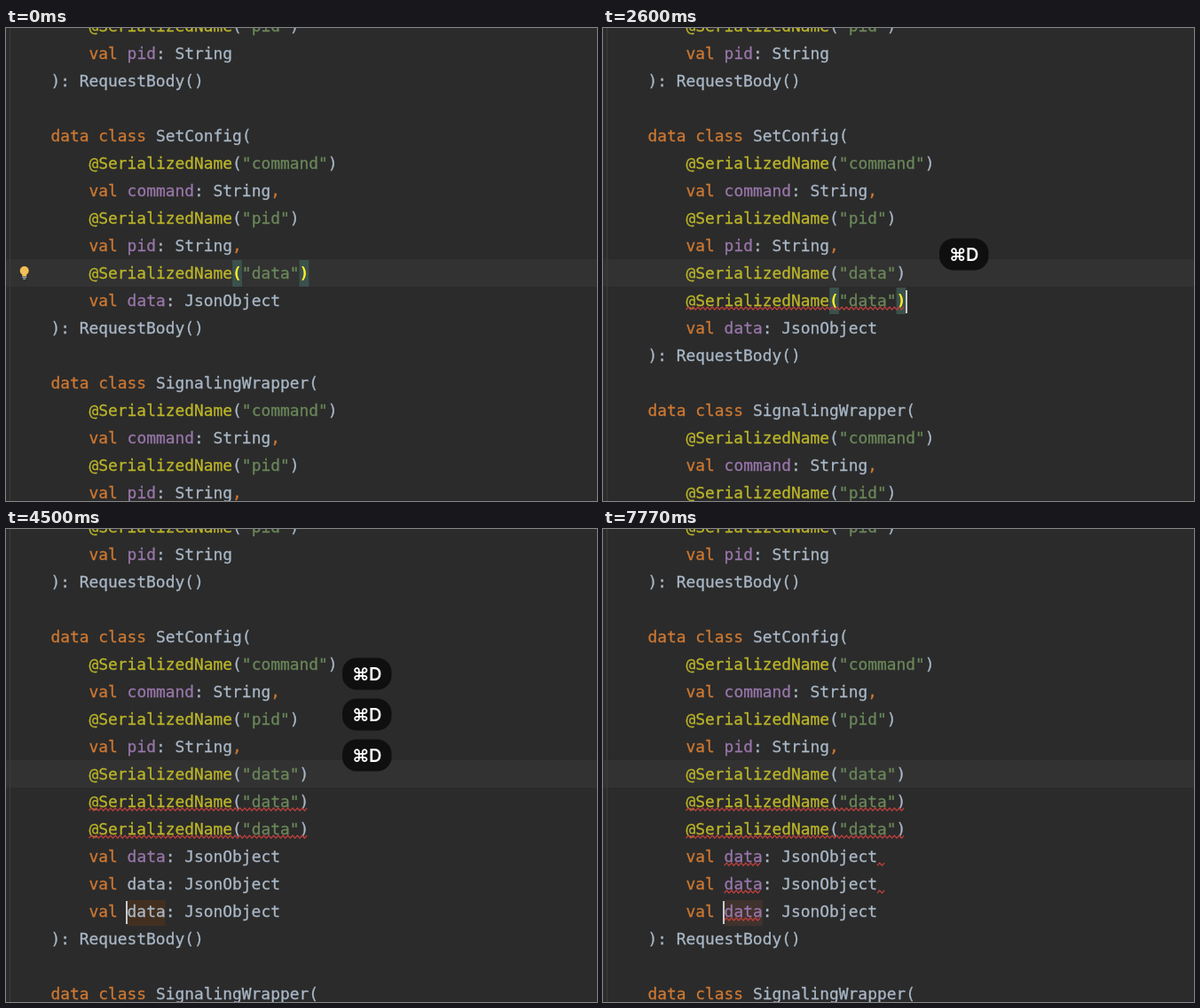
Recreate the animation shown at these times as an HTML page. Size 666 by 534 pixels, loop 7.8 s.

```html
<!DOCTYPE html>
<html lang="en">
<head>
<meta charset="utf-8">
<title>Duplicating lines in an editor</title>
<style>
  html, body { margin: 0; width: 100%; height: 100%; overflow: hidden; background: #2b2b2b; }
  svg { display: block; }
  .code text { font: 17.9px "DejaVu Sans Mono", monospace; white-space: pre; stroke-width: 0.3px; }
  .code text { fill: #a9b7c6; stroke: #a9b7c6; }
  .code .keyword { fill: #cc7832; stroke: #cc7832; }
  .code .annotation { fill: #bbb529; stroke: #bbb529; }
  .code .string { fill: #6a8759; stroke: #6a8759; }
  .code .property { fill: #9876aa; stroke: #9876aa; }
  .code .brace { fill: #ffef28; stroke: none; font-weight: bold; }
  .keys text { font: 600 20px Inter, "DejaVu Sans", sans-serif; fill: #fff; }
</style>
</head>
<body>
<svg id="stage" width="666" height="534" viewBox="0 0 666 534"></svg>
<script>
const LOOP = 7800;
const LEFT = 50.4, CHAR = 10.776, ROW = 31, FIRST_BASELINE = 4;
const DATA_ROW = 9;

// Key presses: the first two repeat the annotation, the last two the property.
const PRESSES = [2050, 2670, 3970, 4300];
const PILL_LIFE = 2350, PILL_FADE = 200;
const CARET_MOVED = 3750;
const ERRORS_AT = { firstCopy: 2500, secondCopy: 3060, properties: 5480 };
const BULB_SPANS = [[0, 970], [5480, 7000]];
const CARET_OFF = [[0, 430], [970, 1505], [3100, 3570], [4930, 5430], [6030, 6500], [7100, 7570]];

const stage = document.getElementById('stage');
const within = (t, spans) => spans.some(([from, to]) => t >= from && t < to);
const columnX = column => LEFT + column * CHAR;
const baseline = row => FIRST_BASELINE + row * ROW;
const rect = (x, y, w, h, fill, extra = '') =>
  `<rect x="${x}" y="${y}" width="${w}" height="${h}" fill="${fill}" ${extra}/>`;

const field = (name, type) => [`    @SerializedName("${name}")`, `    val ${name}: ${type}`];

function sourceLines(annotations, properties) {
  const [annotation, property] = field('data', 'JsonObject');
  return [
    ...field('pid', 'String'),
    '): RequestBody()',
    '',
    'data class SetConfig(',
    ...field('command', 'String,'),
    ...field('pid', 'String,'),
    ...Array(annotations).fill(annotation),
    ...Array(properties).fill(property),
    '): RequestBody()',
    '',
    'data class SignalingWrapper(',
    ...field('command', 'String,'),
    ...field('pid', 'String,')
  ];
}

const TOKEN = /(data class|val(?= ))|(@\w+)|("\w+")|((?<=val )\w+)|(,)|([()])/g;

function codeLine(text, row, { braces = false, unresolved = false }) {
  const span = (kind, s) => `<tspan class="${kind}">${s}</tspan>`;
  const body = text.trimStart();
  const markup = body.replace(TOKEN, (all, keyword, annotation, string, property, comma, paren) => {
    if (keyword || comma) return span('keyword', all);
    if (annotation) return span('annotation', all);
    if (string) return span('string', all);
    if (property && !unresolved) return span('property', all);
    return paren && braces ? span('brace', all) : all;
  });
  const x = columnX(text.length - body.length);
  return `<text x="${x}" y="${baseline(row)}">${markup}</text>`;
}

function squiggle(row, column, length) {
  const step = 2.7, start = columnX(column), y = baseline(row) + 4;
  let path = `M${start} ${y}`;
  for (let i = 1; i * step <= length * CHAR; i++) path += `L${start + i * step} ${y - (i % 2) * 3}`;
  return `<path d="${path}" fill="none" stroke="#bc3f3c" stroke-width="1.2"/>`;
}

function bulb(row) {
  const y = baseline(row) - 9;
  return `<circle cx="20.7" cy="${y}" r="5" fill="#f2bf56"/>` +
    rect(18.2, y + 3, 5, 3, '#f2bf56') +
    rect(18.2, y + 6.5, 5, 1.4, '#a9adb0') +
    rect(19.2, y + 8.6, 3, 1.2, '#a9adb0');
}

function keyPill(slot, opacity) {
  const y = 237.5 - slot * 46;
  return `<g opacity="${opacity}">${rect(379, y, 55.5, 36, '#0f0f0f', 'rx="16"')}` +
    `<text x="390" y="${y + 25}">\u2318</text><text x="409" y="${y + 25}">D</text></g>`;
}

function keyPills(t) {
  const pressed = PRESSES.filter(p => t >= p);
  return pressed.map((p, i) => {
    const opacity = Math.min(1, (p + PILL_LIFE - t) / PILL_FADE);
    return opacity > 0 ? keyPill(pressed.length - 1 - i, opacity) : '';
  }).join('');
}

function scene(t) {
  const pressed = PRESSES.filter(p => t >= p).length;
  const annotations = 1 + Math.min(pressed, 2);
  const properties = 1 + Math.max(pressed - 2, 0);
  const firstProperty = DATA_ROW + annotations;
  const onProperty = t >= CARET_MOVED;
  const resolved = t >= ERRORS_AT.properties;
  const caretRow = onProperty ? firstProperty + properties - 1 : firstProperty - 1;
  const caretTop = baseline(caretRow) - 18;

  let back = rect(0, 0, 666, 534, '#2b2b2b') + rect(0, 261, 666, 31, '#323232') +
    rect(4, 0, 1, 534, '#3c3c3c');
  if (onProperty) {
    back += rect(columnX(8), caretTop - 1, 4 * CHAR, 29, resolved ? '#40322d' : '#432f20');
  } else {
    for (const column of [19, 26]) back += rect(columnX(column), caretTop - 3, CHAR, 30, '#3b514d');
  }

  const text = sourceLines(annotations, properties).map((line, row) => codeLine(line, row, {
    braces: !onProperty && row === caretRow,
    unresolved: !resolved && row > firstProperty && row < firstProperty + properties
  })).join('');

  let marks = '';
  if (t >= ERRORS_AT.firstCopy) marks += squiggle(DATA_ROW + 1, 4, 23);
  if (t >= ERRORS_AT.secondCopy) marks += squiggle(DATA_ROW + 2, 4, 23);
  if (resolved) {
    for (let i = 0; i < properties; i++) {
      marks += squiggle(firstProperty + i, 8, 4);
      if (i < properties - 1) marks += squiggle(firstProperty + i, 24, 1);
    }
  }
  if (within(t, BULB_SPANS)) marks += bulb(caretRow);
  if (!within(t, CARET_OFF)) {
    marks += rect(onProperty ? 135 : 341, caretTop, 2, 26, '#c8c8c8');
  }

  return `${back}<g class="code">${text}</g>${marks}<g class="keys">${keyPills(t)}</g>`;
}

let shown = '';
function draw(t) {
  const markup = scene(t);
  if (markup !== shown) stage.innerHTML = shown = markup;
}

const start = performance.now();
function tick() {
  draw((performance.now() - start) % LOOP);
  requestAnimationFrame(tick);
}
tick();
</script>
</body>
</html>
```
